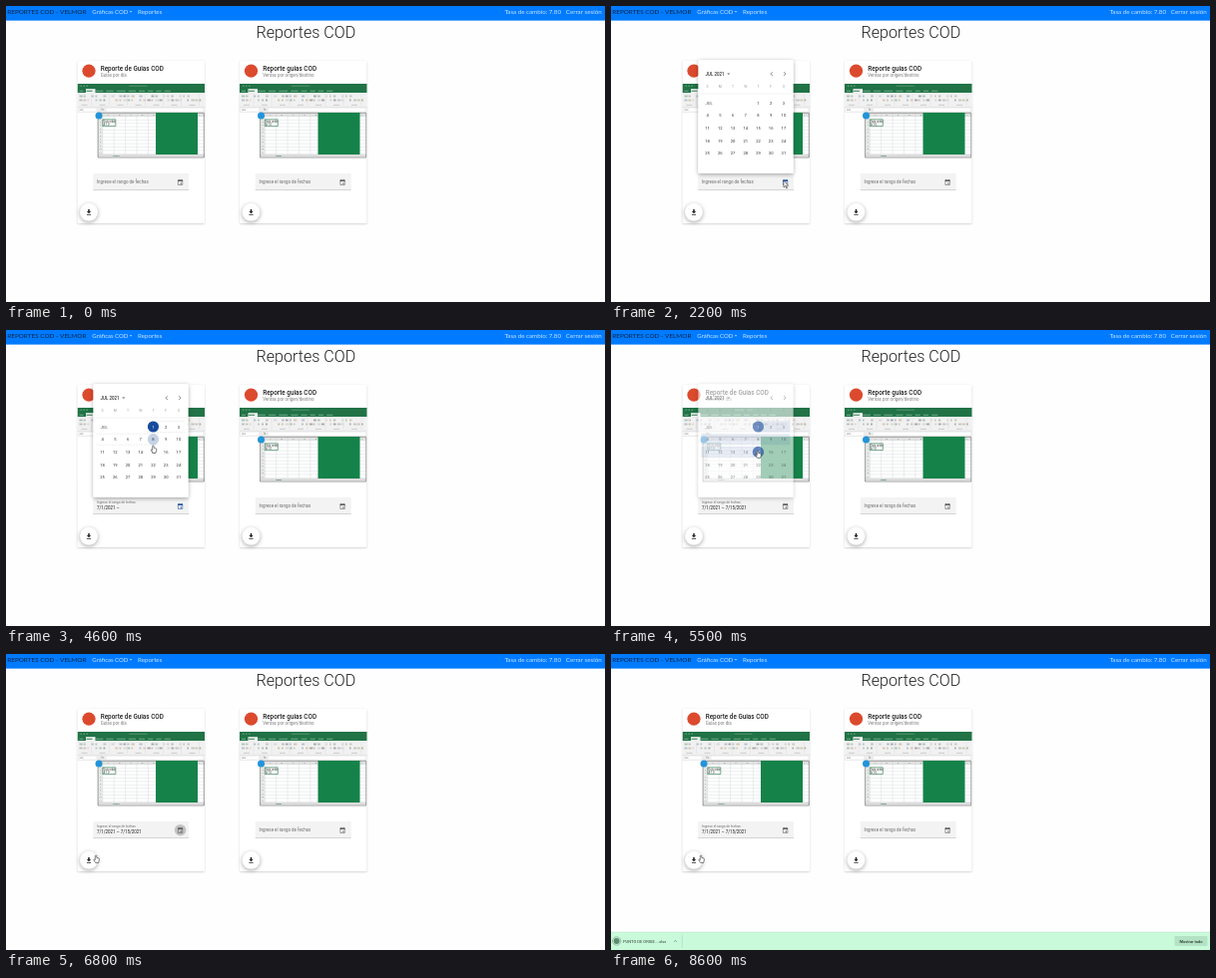
An HTML page with a canvas for the animation above (8.7 s loop, 600x297 px).

```html
<!DOCTYPE html>
<html lang="es">
<head>
<meta charset="utf-8">
<title>Reportes COD</title>
<style>
html, body { margin: 0; width: 100%; height: 100%; overflow: hidden; background: #fefefe; }
canvas { display: block; width: 600px; height: 297px; }
</style>
</head>
<body>
<canvas id="stage"></canvas>
<script>
const W = 600, H = 297, LOOP = 8700, STEP = 100;
const ROBOTO = 'Roboto, sans-serif', LATO = 'Lato, sans-serif';
const BLUE = '#174a9c', INK = '#212121', GREY = '#757575';
const OPEN = 1800, FIRST = 3900, LAST = 5460, DOWNLOAD = 7300;

const canvas = document.getElementById('stage');
const dpr = window.devicePixelRatio || 1;
canvas.width = W * dpr;
canvas.height = H * dpr;
const c = canvas.getContext('2d');

const clamp = v => Math.max(0, Math.min(1, v));
const mix = (a, b, p) => a + (b - a) * p;
const phase = (t, from, to) => clamp((t - from) / (to - from));
const ease = p => p * p * (3 - 2 * p);

function rng(seed) {
  return () => (seed = (seed * 16807) % 2147483647) / 2147483647;
}

function rect(x, y, w, h, fill) {
  c.fillStyle = fill;
  c.fillRect(x, y, w, h);
}

function round(x, y, w, h, r, fill) {
  c.beginPath();
  c.roundRect(x, y, w, h, r);
  c.fillStyle = fill;
  c.fill();
}

function disc(x, y, r, fill) {
  c.beginPath();
  c.arc(x, y, r, 0, 7);
  c.fillStyle = fill;
  c.fill();
}

function path(points, x, y, close) {
  c.beginPath();
  for (let i = 0; i < points.length; i += 2) c.lineTo(x + points[i], y + points[i + 1]);
  if (close) c.closePath();
}

function stroke(color, width) {
  c.strokeStyle = color;
  c.lineWidth = width;
  c.stroke();
}

function line(x1, y1, x2, y2, color, width = 0.4) {
  path([x1, y1, x2, y2], 0, 0);
  stroke(color, width);
}

function text(s, x, y, size, color, weight = 400, align = 'left', family = ROBOTO) {
  c.font = `${weight} ${size}px ${family}`;
  c.textAlign = align;
  c.fillStyle = color;
  c.fillText(s, x, y);
}

function shadowed(blur, dy, alpha, draw) {
  c.save();
  c.shadowColor = `rgba(0,0,0,${alpha})`;
  c.shadowBlur = blur * dpr;
  c.shadowOffsetY = dy * dpr;
  draw();
  c.restore();
}

function triangle(x, y, r, color) {
  path([-r, 0, r, 0, 0, r], x, y, true);
  c.fillStyle = color;
  c.fill();
}

function navbar() {
  const link = 'rgba(255,255,255,.8)';
  rect(0, 0, W, 14.6, '#007bff');
  text('REPORTES COD - VELMOR', 1.2, 8.2, 6.4, '#0b2440', 400, 'left', LATO);
  text('Gráficas COD', 86.3, 8.2, 6, link, 400, 'left', LATO);
  triangle(125, 5.2, 1.4, link);
  text('Reportes', 132, 8.2, 6.2, link, 400, 'left', LATO);
  text('Tasa de cambio: 7.80', 556, 8.2, 6.2, link, 400, 'right', LATO);
  text('Cerrar sesión', 596.6, 8.2, 6.2, link, 400, 'right', LATO);
}

function sheet(x) {
  const rand = rng(71);
  c.save();
  c.beginPath();
  c.rect(x, 78, 127.5, 74.8);
  c.clip();
  rect(x, 78, 128, 75, '#fff');
  rect(x, 78, 128, 9.2, '#217346');
  for (let i = 0; i < 3; i++) rect(x + 3 + i * 3, 79.7, 1.5, 1, '#6da586');
  rect(x + 52, 79.8, 18, 0.8, '#5b9877');
  rect(x + 8.5, 83.2, 9.5, 4.2, '#f3f3f3');
  for (let tx = 2; tx < 88; ) {
    const w = 4 + rand() * 6;
    rect(x + tx, 84.8, w, 0.9, tx > 6 && tx < 16 ? '#217346' : '#7fb196');
    tx += w + 3;
  }

  // ribbon
  rect(x, 87.2, 128, 14.2, '#f1f1f1');
  const tints = ['#a6a6a6', '#c4c4c4', '#d6d6d6', '#b4bfca', '#d2c4ae', '#a9c4b4'];
  for (let tx = 2; tx < 124; tx += 4) {
    for (let row = 0; row < 2; row++) {
      if (rand() < 0.75) rect(x + tx, 89.6 + row * 4, 1.4 + rand() * 2, 1.8, tints[Math.floor(rand() * 6)]);
    }
  }
  for (let i = 0; i < 7; i++) {
    rect(x + 4 + i * 18, 98.9, 6, 0.7, '#bdbdbd');
    line(x + 14 + i * 18, 88.5, x + 14 + i * 18, 100, '#d8d8d8');
  }
  line(x, 101.4, x + 128, 101.4, '#c6c6c6', 0.5);

  // formula bar
  rect(x, 101.7, 128, 5.3, '#ececec');
  rect(x + 1, 102.7, 18, 3, '#fff');
  rect(x + 29, 102.7, 97, 3, '#fff');
  rect(x + 2, 103.7, 4, 0.8, '#999');
  text('fx', x + 24, 105.2, 2.6, '#777');

  // cells
  rect(x + 20.5, 107.5, 107, 3.4, '#e2e2e2');
  rect(x + 20.5, 110.9, 4.8, 38, '#ececec');
  for (let i = 0; i < 10; i++) {
    const gx = x + 25.3 + i * 11.4;
    line(gx, 107.5, gx, 148.8, '#c6cacf', 0.35);
    text(String.fromCharCode(65 + i), gx + 5.5, 110.2, 2.5, '#777', 400, 'center');
  }
  for (let i = 0; i < 12; i++) {
    const gy = 110.9 + i * 3.4;
    line(x + 20.5, gy, x + 127.5, gy, '#ccd0d4', 0.35);
    if (i < 11) text(i + 1, x + 23, gy + 2.7, 2.2, '#777', 400, 'center');
  }
  text('Guía orden', x + 26, 116.7, 2.6, '#333');
  text('A-1.0', x + 26, 120, 2.6, '#333');
  c.beginPath();
  c.rect(x + 25.3, 113.8, 13, 6.8);
  stroke('#217346', 0.6);
  rect(x + 20.5, 148.8, 107, 3, '#dcdcdc');
  text('Hoja1', x + 36, 151.2, 2.4, '#217346', 500);
  c.beginPath();
  c.rect(x + 20.6, 107.3, 106.2, 44.9);
  stroke('#777', 0.7);
  disc(x + 21.5, 110, 3.5, '#2494d8');

  rect(x + 78.5, 107, 42, 42, '#15824a');
  c.restore();
}

function calendarIcon(x, y, color) {
  c.beginPath();
  c.rect(x - 2.2, y - 2, 4.4, 4.6);
  stroke(color, 0.55);
  rect(x - 2.4, y - 2.3, 4.8, 1.3, color);
  rect(x - 1.7, y - 3, 0.6, 1, color);
  rect(x + 1.1, y - 3, 0.6, 1, color);
  rect(x + 0.1, y + 0.5, 1.2, 1.2, color);
}

function field(x, { float = 0, value = '', hover, focus, active }) {
  round(x, 168, 96, 16.6, [1.3, 1.3, 0, 0], hover ? '#ededed' : '#f3f3f3');
  rect(x, hover ? 183.8 : 184.2, 96, hover ? 0.8 : 0.45, hover ? '#333' : '#a5a5a5');
  text('Ingrese el rango de fechas', x + 3.7, mix(178.3, 174.4, float), mix(4.45, 3.34, float), '#6c6c6c');
  if (value) text(value, x + 3.7, 180.3, 4.45, INK);
  if (focus) disc(x + 87.4, 176.7, 5.8, '#c3c3c3');
  calendarIcon(x + 87.4, 176.9, active ? BLUE : '#555');
}

function downArrow(x, y, size, color) {
  const s = size;
  path([-0.8 * s, -3 * s, 0.8 * s, -3 * s, 0.8 * s, -1 * s, 2.2 * s, -1 * s, 0, 1.3 * s, -2.2 * s, -1 * s, -0.8 * s, -1 * s], x, y, true);
  c.fillStyle = color;
  c.fill();
}

function fab(x, press) {
  shadowed(4, 1.3, 0.34, () => disc(x, 206.8, 9, '#fff'));
  if (press) disc(x, 206.8, 9, `rgba(0,0,0,${0.18 * press})`);
  downArrow(x, 206.9, 0.95, INK);
  rect(x - 2.1, 208.9, 4.2, 0.8, INK);
}

function card(x, title, sub, state, press) {
  shadowed(1.8, 0.6, 0.2, () => round(x, 55, 127.5, 163.3, 1.2, '#fff'));
  disc(x + 11.5, 65.2, 6.6, '#dc4a2e');
  text(title, x + 23.2, 64.6, 6.36, INK, 500);
  text(sub, x + 23.2, 71.2, 4.45, '#7b7b7b');
  sheet(x);
  field(x + 15.7, state);
  fab(x + 11.5, press);
}

// day d of a month starting on a Thursday
const dayX = d => 96.6 + ((d + 3) % 7) * 12.72;
const dayY = d => 97 + Math.floor((d + 3) / 7) * 12.7;

function dayAt(p) {
  for (let d = 1; d <= 31; d++) {
    if (Math.abs(dayX(d) - p.x) < 6.36 && Math.abs(dayY(d) - p.y) < 6.35) return d;
  }
  return 0;
}

function range(last, done) {
  c.save();
  for (let d = 1; d <= last; d++) {
    const x = dayX(d), y = dayY(d);
    if (done) {
      rect(d === 1 ? x : x - 6.36, y - 5.6, d === 1 || d === last ? 6.36 : 12.72, 11.2, 'rgba(23,74,156,.16)');
    } else {
      c.setLineDash([0.8, 0.8]);
      line(x - 6.3, y - 5.5, x + 6.3, y - 5.5, '#bbb', 0.35);
      line(x - 6.3, y + 5.5, x + 6.3, y + 5.5, '#bbb', 0.35);
    }
  }
  c.restore();
}

// the shadow stays outside the panel, so a fading panel keeps a clean white
function panel(x, y, w, h) {
  c.save();
  c.beginPath();
  c.rect(0, 0, W, H);
  c.roundRect(x, y, w, h, 1.2);
  c.clip('evenodd');
  shadowed(4, 1.2, 0.35, () => round(x, y, w, h, 1.2, '#fff'));
  c.restore();
  round(x, y, w, h, 1.2, '#fff');
}

function popup(t, pointer) {
  const alpha = phase(t, OPEN - 60, OPEN + 60) * (1 - phase(t, LAST, LAST + 100));
  if (!alpha) return;
  const grow = mix(0.85, 1, phase(t, OPEN - 60, OPEN + 60));
  c.save();
  c.globalAlpha = alpha;
  c.translate(0, 54);
  c.scale(1, grow);
  c.translate(0, -54);
  panel(87.5, 54, 95, 113.8);
  text('JUL 2021', 94.6, 69.6, 4.45, '#333', 500);
  triangle(117.8, 67.4, 1.6, '#666');
  path([0.9, -1.9, -1, 0, 0.9, 1.9], 161, 68.2);
  stroke('#555', 0.7);
  path([-0.9, -1.9, 1, 0, -0.9, 1.9], 174, 68.2);
  stroke('#555', 0.7);
  [...'SMTWTFS'].forEach((s, i) => text(s, 96.6 + i * 12.72, 81.5, 3.5, '#a0a0a0', 400, 'center'));
  line(87.5, 88, 182.5, 88, '#dedede');
  text('JUL', 94.4, 98.5, 4.2, GREY, 500);

  const picked = t >= FIRST, done = t >= LAST;
  const over = dayAt(pointer);
  if (picked) range(done ? 15 : over, done);
  if (over) disc(dayX(over), dayY(over), 5.6, picked ? 'rgba(23,74,156,.25)' : '#e6e6e6');
  if (picked) disc(dayX(1), dayY(1), 5.6, BLUE);
  if (done) disc(dayX(15), dayY(15), 5.6, BLUE);
  for (let d = 1; d <= 31; d++) {
    const chosen = (picked && d === 1) || (done && d === 15);
    text(d, dayX(d), dayY(d) + 1.5, 4.15, chosen ? '#fff' : '#333', 400, 'center');
  }
  c.restore();
}

function downloads(t) {
  if (t < DOWNLOAD) return;
  const wide = ease(phase(t, 7400, 7800));
  const end = mix(19, 64.5, wide);
  rect(0, 279, W, 18, '#c9fbdb');
  rect(0, 278.8, W, 0.5, '#b4d9c1');
  disc(5.6, 288, 3, '#5d8a70');
  c.beginPath();
  c.arc(5.6, 288, 4.2, 0, 7);
  stroke(t < 8000 ? '#35483d' : '#8cae9a', 0.8);
  c.save();
  c.beginPath();
  c.rect(11, 280, Math.max(0, end - 15), 17);
  c.clip();
  text('PUNTO DE ORIGE....xlsx', 12, 289.8, 4.1, '#303b35');
  c.restore();
  path([-1.3, 0.8, 0, -0.6, 1.3, 0.8], end, 288);
  stroke('#56665c', 0.6);
  if (wide === 1) line(71.3, 282, 71.3, 295, '#a2c8b0', 0.5);
  round(564.5, 283, 33, 10, 1, '#b3e3c4');
  text('Mostrar todo', 581, 289.7, 4, '#26352c', 500, 'center');

  const fall = phase(t, DOWNLOAD, 7700);
  if (fall < 1) {
    c.save();
    c.globalAlpha = fall < 0.5 ? 1 : 2 - 2 * fall;
    const y = 259 + fall * 40;
    downArrow(8, y + 0.7, 1.5, '#3b8bea');
    rect(3, y + 7.6, 10, 0.7, '#3b8bea');
    c.restore();
  }
}

// time, x, y, hand shape until the next point
const ROUTE = [
  [300, 138, -8, 0], [1000, 166, 154, 0], [1200, 173, 175, 1], [2200, 173, 175, 0],
  [2500, 166, 150, 1], [2900, 163, 112, 1], [3000, 163, 112, 1], [3400, 153.2, 92, 1],
  [3800, 149, 95, 1], [4100, 149, 95, 1], [4800, 147, 121, 1], [5700, 147, 121, 0],
  [6600, 90, 202, 1], [LOOP, 90, 202, 1]
];

function pointerAt(t) {
  const i = ROUTE.findIndex(p => p[0] > t) - 1;
  if (i < 0) return { x: -50, y: -50, hand: 0 };
  const a = ROUTE[i], b = ROUTE[i + 1];
  const p = ease(phase(t, a[0], b[0]));
  return { x: mix(a[1], b[1], p), y: mix(a[2], b[2], p), hand: a[3] };
}

const HAND = [-0.7, 0.4, 0, 0, 0.7, 0.4, 0.8, 2.5, 2.1, 2.7, 3.2, 3.2, 3.4, 4, 3, 6.1, 2.6, 7.5, -0.3, 7.5, -2.1, 4.7, -1.8, 3.9, -0.7, 4.7];
const ARROW = [0, 0, 0, 7, 1.6, 5.5, 2.7, 8, 3.6, 7.6, 2.5, 5.2, 4.6, 5.2];

function cursor(p) {
  c.save();
  c.lineJoin = 'round';
  path(p.hand ? HAND : ARROW, p.x, p.y, true);
  c.fillStyle = '#fff';
  c.fill();
  stroke('#333', 0.6);
  c.restore();
}

function draw(t) {
  const pointer = pointerAt(t);
  c.setTransform(dpr, 0, 0, dpr, 0, 0);
  rect(0, 0, W, H, '#fefefe');
  navbar();
  text('Reportes COD', 300.3, 32.3, 16.1, INK, 300, 'center');
  card(71.5, 'Reporte de Guias COD', 'Guias por día', {
    float: phase(t, FIRST - 100, FIRST + 100),
    value: t >= LAST ? '7/1/2021 – 7/15/2021' : t >= FIRST ? '7/1/2021 –' : '',
    hover: t >= 1100 && t < OPEN,
    focus: t >= LAST + 100 && t < 7200,
    active: t >= OPEN && t < LAST
  }, t < 7200 ? 0 : 1 - phase(t, 7500, 7900));
  card(234, 'Reporte guias COD', 'Ventas por origen/destino', {}, 0);
  popup(t, pointer);
  downloads(t);
  cursor(pointer);
}

const start = performance.now();
function tick() {
  const t = (performance.now() - start) % LOOP;
  draw(Math.floor(t / STEP) * STEP);
  requestAnimationFrame(tick);
}
tick();
</script>
</body>
</html>
```
